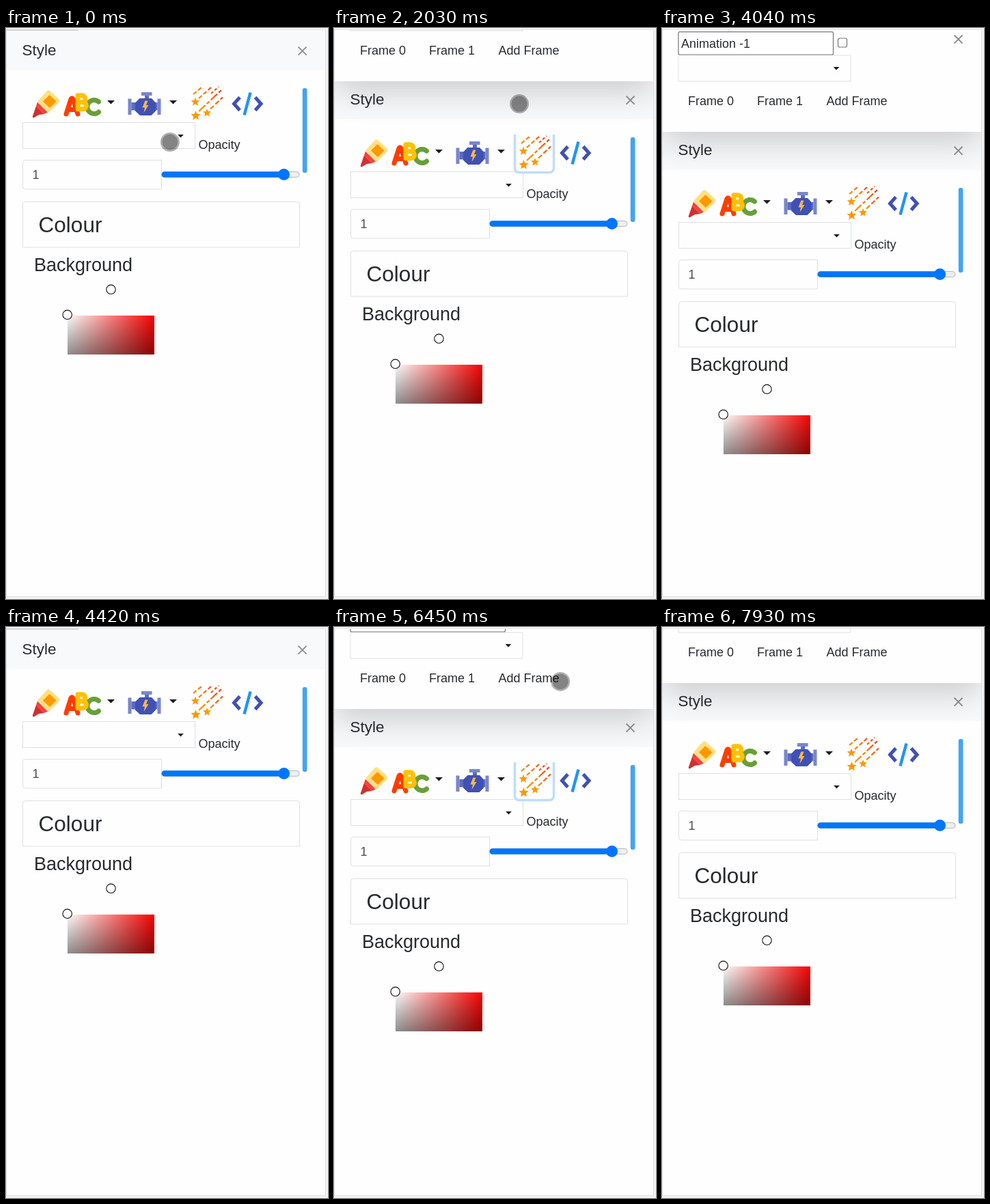
These frames come from a looping animation (471 by 836 pixels, 8 s). An HTML page:

```html
<!DOCTYPE html>
<html lang="en">
<head>
<meta charset="utf-8">
<title>Style panel</title>
<style>
  html, body { margin: 0; width: 100%; height: 100%; overflow: hidden; background: #f4f4f5; }
  svg { display: block; width: 100vw; height: 100vh; }
  text { font-family: "Liberation Sans", Arial, sans-serif; font-size: 18px; fill: #272b2f; }
  .close { stroke: #8e8e8e; stroke-width: 1.9; fill: none; }
  .field { fill: #fefefe; stroke: #dddfe1; }
</style>
</head>
<body>
<svg viewBox="0 0 471 836" xmlns="http://www.w3.org/2000/svg">
  <defs>
    <clipPath id="card"><rect x="1" y="3" width="466" height="829"/></clipPath>
    <clipPath id="toolbar"><rect x="255" y="84" width="80" height="70"/></clipPath>
    <filter id="blur" filterUnits="userSpaceOnUse" x="-100" y="-100" width="670" height="420">
      <feGaussianBlur stdDeviation="24"/>
    </filter>
    <linearGradient id="hue"><stop stop-color="#fafafa"/><stop offset="1" stop-color="#f40404"/></linearGradient>
    <linearGradient id="shade" x2="0" y2="1">
      <stop stop-color="#000" stop-opacity="0"/><stop offset="1" stop-color="#000" stop-opacity=".43"/>
    </linearGradient>
    <linearGradient id="trail" gradientUnits="userSpaceOnUse" x1="278" y1="124" x2="312" y2="92">
      <stop stop-color="#ff9800"/><stop offset=".55" stop-color="#f57c00"/><stop offset="1" stop-color="#ee4422"/>
    </linearGradient>
    <path id="caret" d="M-5.5-2.5H5.5L0 3Z" fill="#1a1c1f"/>
    <path id="cross" class="close" d="M-6-6L6 6M6-6L-6 6"/>
    <path id="star" fill="#ff9800" d="M0-7L2-2.3 7-2 3.2 1.4 4.4 6.4 0 3.7-4.4 6.4-3.2 1.4-7-2-2-2.3Z"/>
  </defs>

  <rect width="471" height="836" fill="#f4f4f5"/>
  <rect x=".5" y="3" width="467" height="829.5" fill="#fefefe" stroke="#dcdddf"/>

  <g clip-path="url(#card)">
    <g id="stylePanel">
      <rect x="1" y="3" width="466" height="58.5" fill="#f8f9fb"/>
      <text x="23.5" y="40" style="font-size:22.5px">Style</text>
      <use href="#cross" x="433.5" y="33.7"/>

      <g>
        <path fill="#ffe082" d="M59.5 92.5Q62 90 64.5 92.5L77.5 104Q80 106.5 77.5 109L62.5 124 46 107.5Z"/>
        <path fill="#ff9800" d="M63.5 98L73.5 107.5 64 117 54 107.5Z"/>
        <path fill="#f44336" d="M46 108.5L61 123.5 55.5 126 44 114.5Z"/>
        <path fill="#d32f2f" d="M44 114.5L55.5 126 48 127 40.5 131.5Q38.5 131.5 39 129Z"/>
      </g>

      <g fill="none" stroke-linecap="round" stroke-linejoin="round" stroke-width="7">
        <path stroke="#689f38" d="M135.5 108A10 10 0 1 0 135.5 123"/>
        <path stroke="#ff3d00" d="M88 126L95 104Q96.500 101.500 98 104L105 126M92 119.500H101"/>
        <path stroke="#ffc107" d="M105 98.700V118.700H112.500A5 5 0 0 0 112.500 108.700H106 111A5 5 0 0 0 111 98.700Z"/>
      </g>
      <use href="#caret" x="153.5" y="108.5"/>

      <g>
        <path fill="#7986cb" d="M198 94h15.5v5H198zM178.5 103.5h5v23.5h-5zM221.5 103.5h5v23.5h-5z"/>
        <path fill="#5c6bc0" d="M203 99h6v5h-6zM183.5 109h7v11.5h-7zM215 109h6.5v11.5H215z"/>
        <path fill="#3f51b5" d="M195.5 103H213L219 109.5V121.5L212.5 128H196L189 121.5V109.5Z"/>
        <path fill="#ffb74d" d="M203.5 106.5H207.5L205 113H208.5L201.5 124 203 116.5H199.5Z"/>
      </g>
      <use href="#caret" x="244.5" y="108.5"/>

      <g fill="none" stroke="url(#trail)" stroke-width="2.2">
        <path stroke-dasharray="6 3" d="M274 97L286 87M282 103L300 87"/>
        <path stroke-dasharray="13 3 5 3" d="M282 122L316 90"/>
        <path stroke-dasharray="4 3" d="M300 96L311 86"/>
        <path stroke-dasharray="7 3" d="M299 118.500L317 101.500"/>
      </g>
      <use href="#star" transform="translate(277 108) scale(.9)"/>
      <use href="#star" x="277.5" y="128"/>
      <use href="#star" transform="translate(294 124) scale(.85)"/>

      <g fill="none" stroke="#3f51b5" stroke-width="5">
        <path d="M342 101.5L333.5 111 342 120.5M364.5 101.5L373 111 364.5 120.5"/>
        <path stroke="#2196f3" stroke-width="4.5" d="M357.5 94.5L348.5 127.5"/>
      </g>
      <rect x="433.7" y="88" width="6.7" height="124" rx="3" fill="#42a3f6"/>

      <rect class="field" x="24.5" y="138.5" width="252" height="38"/>
      <use href="#caret" transform="translate(255.500 158) scale(.8)"/>
      <g clip-path="url(#toolbar)">
        <rect id="focusRing" x="264.5" y="76" width="57" height="63.5" rx="6" fill="none" stroke="#bfdcfc" stroke-width="3.5"/>
      </g>
      <text x="281.5" y="177.4">Opacity</text>

      <path class="field" d="M228 193.5H28.5Q24.5 193.5 24.5 197.5V232Q24.5 236 28.5 236H227.5V193.5"/>
      <text x="38.5" y="221" style="fill:#495057">1</text>
      <rect x="228" y="210.5" width="201" height="8" rx="4" fill="#efefef" stroke="#b8b8b8"/>
      <rect x="227.5" y="210.2" width="180" height="8.6" rx="4.3" fill="#0075ff"/>
      <circle cx="406.5" cy="214.5" r="8.5" fill="#0075ff"/>

      <path d="M24.5 321V258.5Q24.5 254.5 28.5 254.5H425.5Q429.5 254.5 429.5 258.5V321Z" fill="#fefefe" stroke="#dfdfe0"/>
      <text x="47.6" y="298.5" style="font-size:31.5px">Colour</text>
      <text x="41" y="355.5" style="font-size:27px">Background</text>

      <rect x="90" y="421" width="127" height="57" fill="url(#hue)"/>
      <rect x="90" y="421" width="127" height="57" fill="url(#shade)"/>
      <g fill="#fefefe" stroke="#111" stroke-width="1.1">
        <circle cx="153.5" cy="382.8" r="6.7"/>
        <circle cx="89.7" cy="419.8" r="6.7"/>
      </g>
    </g>

    <g id="framePanel">
      <rect id="shadow" x="1" y="18" width="466" height="170" fill="#000" filter="url(#blur)"/>
      <rect x="1" y="-10" width="466" height="182" fill="#fefefe"/>
      <rect x="24" y="25.7" width="226.5" height="33.5" rx="2" fill="#fff" stroke="#757575" stroke-width="1.2"/>
      <text x="28" y="49.3">Animation -1</text>
      <rect x="257.5" y="35" width="13" height="13" rx="2.5" fill="#fff" stroke="#767676" stroke-width="1.2"/>
      <use href="#cross" x="433.5" y="36.5"/>
      <rect class="field" x="24" y="60" width="252" height="38"/>
      <use href="#caret" transform="translate(255 79) scale(.8)"/>
      <text x="38" y="133.3">Frame 0</text>
      <text x="139" y="133.3">Frame 1</text>
      <text x="240.5" y="133.3">Add Frame</text>
    </g>
  </g>

  <path id="topLine" d="M0 3.2H106" stroke="#c4c5c7" stroke-width="1.2"/>

  <g id="cursor">
    <circle r="14" opacity=".3"/>
    <circle r="11.5" opacity=".25"/>
  </g>
</svg>

<script>
const LOOP = 8000, SLIDE = 500, DROP = 166;
const opens = [1802, 6140], closes = [3927, 7668];
const focused = [[1770, 3870], [5900, 7610]];

// Pointer strokes: [time, x, y]; the pointer is hidden between strokes.
const strokes = [
  [[0, 240, 167], [320, 194, 161], [430, 195, 162], [620, 215, 169], [900, 275, 140],
   [1240, 336, 112], [1310, 330, 110], [1620, 277, 110], [1770, 277, 110], [2030, 271, 111],
   [2570, 295, 131], [2640, 298, 130], [3000, 360, 100], [3200, 415, 66], [3410, 457, 47]],
  [[4790, 356, 92], [4960, 320, 104], [5060, 320, 104], [5440, 307, 110], [5669, 307, 110],
   [5670, 305, 108], [6140, 305, 108], [6450, 331, 80], [6680, 378, 60], [6760, 378, 60]]
];

const $ = id => document.getElementById(id);
const show = (id, on) => $(id).setAttribute("visibility", on ? "visible" : "hidden");
const move = (id, x, y) => $(id).setAttribute("transform", `translate(${x} ${y})`);
const swing = u => 0.5 - 0.5 * Math.cos(Math.PI * Math.min(1, Math.max(0, u)));
const within = (t, [a, b]) => t >= a && t < b;

// The panel settles on whole pixels.
function dropAt(t) {
  const sum = starts => starts.reduce((s, a) => s + swing((t - a) / SLIDE), 0);
  return Math.round(DROP * (sum(opens) - sum(closes)));
}

function pointerAt(t) {
  const path = strokes.find(s => within(t, [s[0][0], s[s.length - 1][0]]));
  if (!path) return null;
  const i = path.findIndex(k => k[0] > t);
  const [t0, x0, y0] = path[i - 1], [t1, x1, y1] = path[i];
  const u = (t - t0) / (t1 - t0);
  return [x0 + (x1 - x0) * u, y0 + (y1 - y0) * u];
}

function draw(t) {
  const d = dropAt(t);
  move("stylePanel", 0, d);
  move("framePanel", 0, d - DROP);
  show("framePanel", d > 0);
  $("shadow").setAttribute("opacity", 0.175 * Math.min(1, d / 30));
  show("topLine", d === 0 || d === DROP);
  show("focusRing", focused.some(f => within(t, f)));
  const p = pointerAt(t);
  show("cursor", p);
  if (p) move("cursor", ...p);
}

const start = performance.now();
function tick() {
  draw((performance.now() - start) % LOOP);
  requestAnimationFrame(tick);
}
draw(0);
requestAnimationFrame(tick);
</script>
</body>
</html>
```
